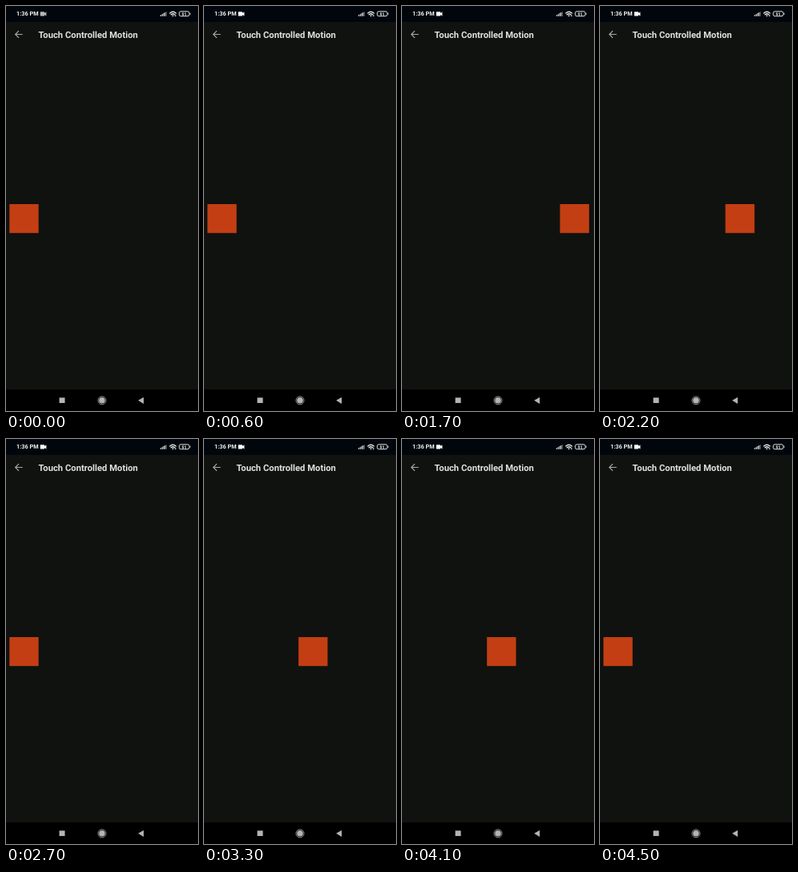
An HTML page for the animation above (5100 ms loop, 240 px wide and 507 px high).

```html
<!DOCTYPE html>
<html lang="en">
<head>
<meta charset="utf-8">
<title>Touch Controlled Motion</title>
<style>
  html, body { margin: 0; width: 100%; height: 100%; overflow: hidden; background: #10120f; }
  svg { display: block; width: 100%; height: 100%; }
  text { font-family: Roboto, "Noto Sans", sans-serif; text-rendering: geometricPrecision; }
  .time { font-size: 7.3px; font-weight: 700; fill: #f4f5f5; }
  .title { font-size: 11.25px; font-weight: 700; fill: #e0e1de; }
  .level { font-size: 5.2px; font-weight: 700; fill: #f0f1f1; }
  .line { fill: none; }
  #camera { animation: light 5100ms step-end infinite; }
  @keyframes light {
    0% { fill: #b4b8ba; }
    7.843% { fill: #ccd0d1; }
    9.804% { fill: #e2e5e5; }
    11.765%, 100% { fill: #fbfcfc; }
  }
</style>
</head>
<body>
<svg viewBox="0 0 240 507">
  <rect width="240" height="507" fill="#10120f"/>
  <rect width="240" height="20" fill="#01060d"/>
  <rect y="480" width="240" height="27" fill="#000"/>

  <text class="time" x="13" y="12.4">1:36 PM</text>
  <path id="camera" d="M42.8 7.2h5.2v1.6l2.4-1.4v5l-2.4-1.4v1.6h-5.2z"/>

  <g class="line" stroke="#e4e6e6" stroke-width="1.2">
    <path d="M193.4 12.8v-1.6M195.2 12.8v-2.6M197 12.8v-3.8M198.8 12.8v-4.9"/>
    <path d="M200.4 12.8v-5.6" stroke="#80868a" stroke-width=".8"/>
  </g>
  <g class="line" stroke="#eceeee" stroke-width="1.4" stroke-linecap="round">
    <path d="M204.8 8.9Q208.6 5.5 212.4 8.9M206.3 10.7Q208.6 8.7 210.9 10.7"/>
    <path d="M208.6 12.2v.1" stroke-width="1.8"/>
    <path d="M211.9 11.3v1.6" stroke-width="1"/>
  </g>
  <rect x="216.5" y="6.8" width="12.6" height="5.9" rx="2" fill="none" stroke="#e4e6e6"/>
  <path d="M230 8.7v2.1" class="line" stroke="#e4e6e6"/>
  <text class="level" x="222.8" y="11.6" text-anchor="middle">91</text>

  <path class="line" d="M20.7 35.5H12M16 31.2L11.7 35.5L16 39.8" stroke="#a6a8a5" stroke-width="1.2"/>
  <text class="title" x="40.5" y="40">Touch Controlled Motion</text>

  <rect id="box" x="4.3" y="248" width="36.4" height="36.2" fill="#c33e13"/>

  <g fill="#b4b4b4">
    <rect x="66.6" y="490.3" width="7" height="6.7"/>
    <circle cx="120" cy="493.8" r="3.8"/>
    <circle cx="120" cy="493.8" r="5" fill="none" stroke="#b4b4b4" stroke-width=".8"/>
    <path d="M165.2 493.8L172.1 489.7V497.9z"/>
  </g>
</svg>
<script>
  const LOOP = 5100, TICK = 100;
  const LEFT = 4.3, TRAVEL = 194.9;
  const DAMPING = 0.85, SPEED = 9;
  const box = document.getElementById('box');

  // Start times; the box heads right and left in turn.
  const moves = [1200, 2107, 3102, 3935];

  // Damped spring from 0 to 1, held at 1 once it arrives.
  function spring(ms) {
    const u = SPEED * ms / 1000;
    const freq = Math.sqrt(1 - DAMPING * DAMPING);
    const arrival = (Math.PI - Math.atan(freq / DAMPING)) / freq;
    if (u >= arrival) return 1;
    const wave = Math.cos(freq * u) + DAMPING / freq * Math.sin(freq * u);
    return 1 - Math.exp(-DAMPING * u) * wave;
  }

  function position(t) {
    const i = moves.findLastIndex(start => t >= start);
    if (i < 0) return 0;
    const p = spring(t - moves[i]);
    return i % 2 ? 1 - p : p;
  }

  function draw() {
    const t = Math.floor(performance.now() % LOOP / TICK) * TICK;
    box.setAttribute('x', (LEFT + TRAVEL * position(t)).toFixed(2));
    requestAnimationFrame(draw);
  }
  draw();
</script>
</body>
</html>
```
